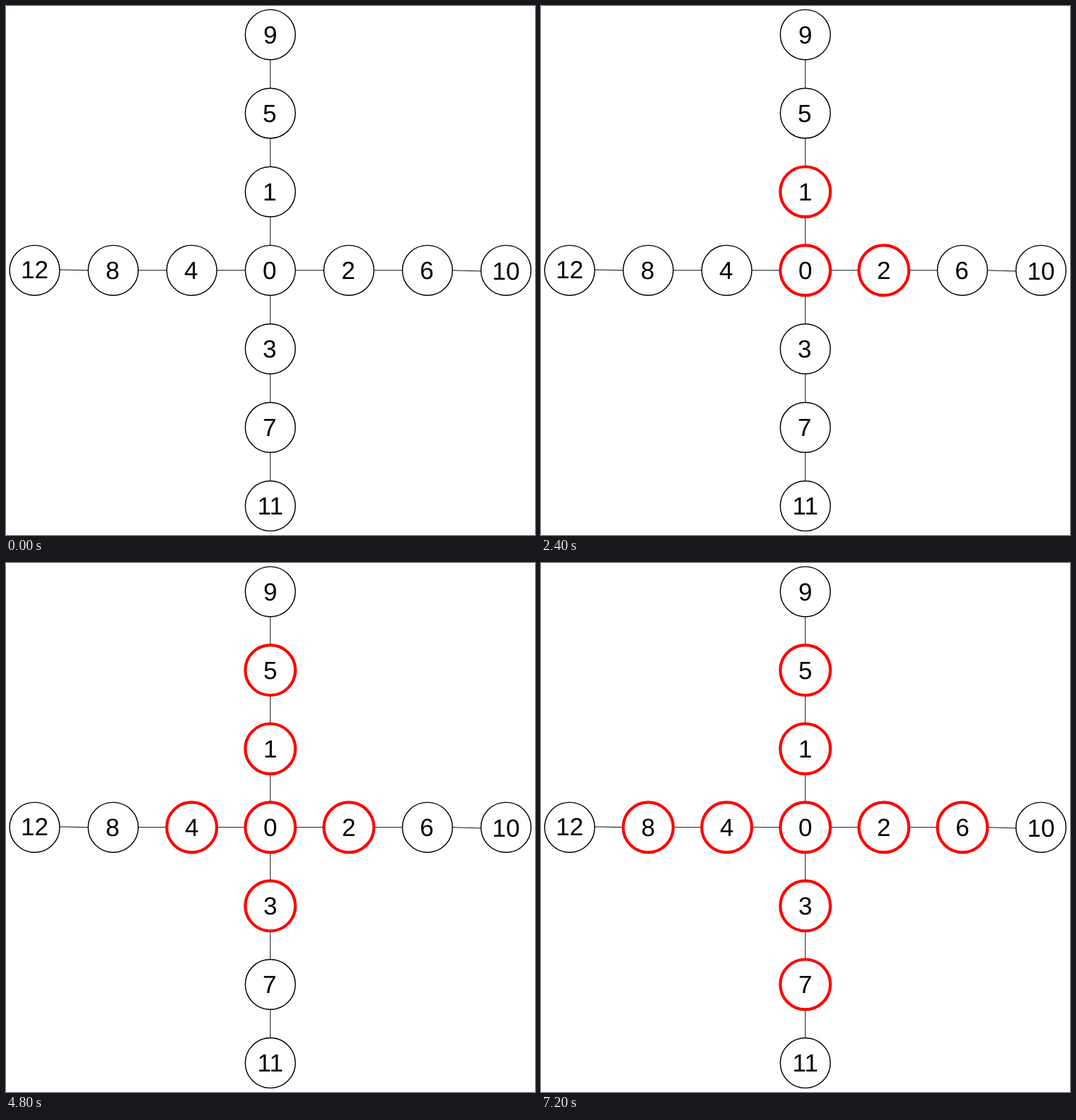
An HTML page that plays this animation: 748x748 px, repeating every 8 s.

```html
<!DOCTYPE html>
<html lang="en">
<head>
<meta charset="utf-8">
<title>Graph traversal</title>
<style>
  html, body { margin: 0; width: 100%; height: 100%; overflow: hidden; background: #fff; }
  svg { display: block; width: 100vw; height: 100vh; }
  line { stroke: #000; stroke-width: .95; }
  circle { fill: none; stroke: #000; stroke-width: 1.45; }
  text { font: 35px "Liberation Sans", Arial, sans-serif; text-anchor: middle; text-rendering: geometricPrecision; }
  .lit circle { stroke: #f00; stroke-width: 4.2; }
  .dim { background: #4c4c4c; }
  .dim .lit circle { stroke: #1c1c1c; }
</style>
</head>
<body>
<svg id="stage" viewBox="0 0 748 748"></svg>
<script>
  const STEP = 800, STEPS = 10;
  const MID = 373.75, GAP = 111.08, RADIUS = 35.4;
  const DIRS = [[0, -1], [1, 0], [0, 1], [-1, 0]];
  // The outer horizontal nodes sit slightly off the axis.
  const TILT = { 10: 1.2, 12: -.8 };
  const stage = document.getElementById('stage');

  function add(parent, tag, attrs = {}) {
    const el = document.createElementNS('http://www.w3.org/2000/svg', tag);
    for (const key in attrs) el.setAttribute(key, attrs[key]);
    return parent.appendChild(el);
  }

  function place(id) {
    if (!id) return { x: MID, y: MID };
    const [dx, dy] = DIRS[(id - 1) % 4], ring = Math.ceil(id / 4);
    return { x: MID + dx * ring * GAP, y: MID + dy * ring * GAP };
  }

  function link(id) {
    const a = place(Math.max(0, id - 4)), b = place(id);
    const [dx, dy] = DIRS[(id - 1) % 4];
    add(stage, 'line', {
      x1: a.x + dx * RADIUS, y1: a.y + dy * RADIUS,
      x2: b.x - dx * RADIUS, y2: b.y - dy * RADIUS + (TILT[id] || 0)
    });
  }

  function makeNode(id) {
    const { x, y } = place(id);
    const group = add(stage, 'g');
    add(group, 'circle', { cx: x, cy: y, r: RADIUS });
    const label = add(group, 'text', { x, y: y + 12.2 + (TILT[id] || 0) });
    label.textContent = id;
    return { group, label, x, inset: id < 9 ? -.9 : 0 };
  }

  for (let id = 1; id <= 12; id++) link(id);
  const nodes = Array.from({ length: 13 }, (_, id) => makeNode(id));

  let shown = -1;
  function show(step) {
    if (step === shown) return;
    shown = step;
    stage.classList.toggle('dim', step === 1);
    const last = step > 1 ? step - 1 : step - 1;
    nodes.forEach(({ group, label, x, inset }, id) => {
      const lit = id <= last;
      group.classList.toggle('lit', lit);
      label.setAttribute('x', lit ? x : x + inset);
    });
  }

  const start = performance.now();
  function tick() {
    const time = performance.now() - start;
    show(Math.floor(time / STEP) % STEPS);
    requestAnimationFrame(tick);
  }
  tick();
</script>
</body>
</html>
```
